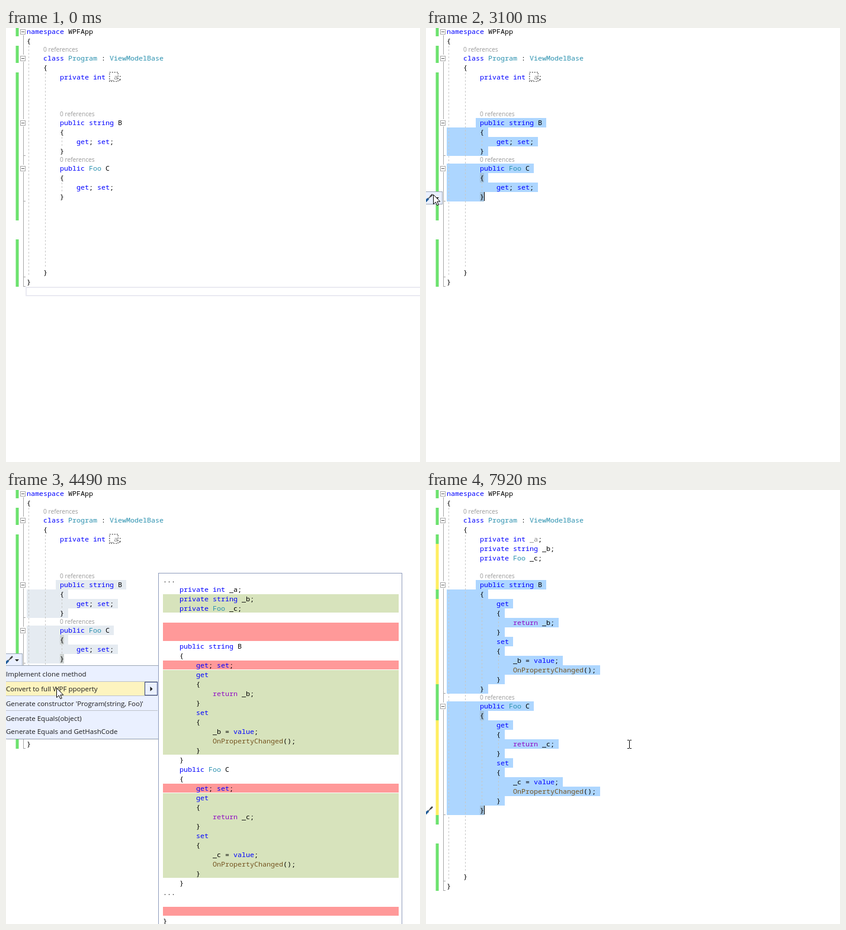
An HTML page with a canvas for the animation above (7.99 s loop, 699 by 733 pixels).

```html
<!DOCTYPE html>
<html lang="en">
<head>
<meta charset="utf-8">
<title>Convert to full property</title>
<style>
html, body { margin: 0; width: 100%; height: 100%; overflow: hidden; background: #fff; }
canvas { display: block; }
</style>
</head>
<body>
<canvas id="stage" width="699" height="733"></canvas>
<script>
const ctx = document.getElementById('stage').getContext('2d');
const LOOP = 7990, COL = 7, ROW = 16, LEFT = 35;
const CODE = '11.667px "Noto Sans Mono", monospace';
const UI = '11.5px "Open Sans", "Noto Sans", sans-serif';
const LENS = '10.2px "Open Sans", "Noto Sans", sans-serif';
const GREEN = '#6ce26e', YELLOW = '#ffee62', GRAY = '#a5a5a5';
const ADD = '#d7e3bc', ADD_PALE = '#ebf1dd', DEL = '#ff9999', DEL_PALE = '#ffcccc';

const KEYWORD = /^(namespace|class|private|public|int|string|object|new|get|set|value)$/;
const TYPE = /^(Program|ViewModelBase|Foo|ICloneable)$/;
const METHOD = /^(OnPropertyChanged|Clone)$/;

// ---- text ----
const FULL = 2, BASIC = 1, PLAIN = 0;

function colorOf(word, level) {
  if (level === PLAIN) return '#000';
  if (KEYWORD.test(word)) return '#0000ff';
  if (word === 'return') return level === FULL ? '#8f08c4' : '#0000ff';
  if (level === FULL && TYPE.test(word)) return '#2b91af';
  if (level === FULL && METHOD.test(word)) return '#74531f';
  return '#000';
}

function label(text, x, y, font, color) {
  ctx.font = font;
  ctx.fillStyle = color;
  ctx.fillText(text, x, y);
}

function code(text, x, y, level = FULL) {
  for (const m of text.matchAll(/\w+|[^\w\s]+/g))
    label(m[0], x + m.index * COL, y + 4, CODE, colorOf(m[0], level));
}

// ---- documents: '@' marks a line with a reference count above, '+' a new line ----
const auto = ['            get; set;'];
const full = name => [
  'get', '{', `    return ${name};`, '}',
  'set', '{', `    ${name} = value;`, '    OnPropertyChanged();', '}'
].map(s => '+            ' + s);

function layout(fields, bodyB, bodyC, blanks) {
  const raw = [
    'namespace WPFApp', '{', '@    class Program : ViewModelBase', '    {',
    '        private int _a;', ...fields, '',
    '@        public string B', '        {', ...bodyB, '        }',
    '@        public Foo C', '        {', ...bodyC, '        }',
    ...Array(blanks).fill(''), '    }', '}'
  ];
  let y = 6 - ROW;
  return raw.map(s => {
    const lens = s[0] === '@', added = s[0] === '+';
    y += lens ? 29 : ROW;
    const text = lens || added ? s.slice(1) : s;
    return { y, text, lens, added, end: LEFT + text.length * COL, x: LEFT + text.search(/\S|$/) * COL };
  });
}

const before = {
  lines: layout(['', ''], auto, auto, 7),
  bars: [[0, 14], [30, 59], [75, 325], [357, 437]], edits: [],
  folds: [6, 51, 160, 237], ticks: [215, 292, 420, 436],
  guides: [[38, 30, 420], [66, 76, 405], [94, 184, 200], [94, 261, 277]],
  first: 160, last: 285, braces: [253, 285]
};
const after = {
  lines: layout(['+        private string _b;', '+        private Foo _c;'], full('_b'), full('_c'), 6),
  bars: [[0, 14], [30, 59], [75, 91], [168, 184], [328, 389], [549, 565], [597, 677]],
  edits: [[91, 168], [184, 328], [389, 549]],
  folds: [6, 51, 160, 365], ticks: [343, 548, 660, 676],
  guides: [[38, 30, 660], [66, 76, 645], [94, 184, 328], [94, 389, 533],
    [122, 216, 232], [122, 280, 312], [122, 421, 437], [122, 485, 517]],
  first: 160, last: 541, braces: [381, 541]
};

// ---- shapes ----
function rect(x0, y0, x1, y1, color) {
  ctx.fillStyle = color;
  ctx.fillRect(x0, y0, x1 - x0, y1 - y0);
}

function frame(x0, y0, x1, y1, color, width = 1) {
  const h = width / 2;
  ctx.strokeStyle = color;
  ctx.lineWidth = width;
  ctx.strokeRect(x0 + h, y0 + h, x1 - x0 - width, y1 - y0 - width);
}

function path(points, color, width) {
  ctx.beginPath();
  points.forEach(([x, y]) => ctx.lineTo(x, y));
  ctx.strokeStyle = color;
  ctx.lineWidth = width;
  ctx.stroke();
}

function triangle(a, b, c) {
  ctx.beginPath();
  [a, b, c].forEach(p => ctx.lineTo(...p));
  ctx.fillStyle = '#1b1b1c';
  ctx.fill();
}

function currentLine(y) { frame(33, y - 8, 710, y + 8, '#eaeaf2', 2); }
function caret(x, y) { rect(x, y - 8, x + 1, y + 7, '#000'); }

function selection(doc, endY, endX, color) {
  for (const l of doc.lines) {
    if (l.y < doc.first || l.y > endY) continue;
    const x0 = l.y === doc.first ? 84 : LEFT;
    rect(x0, l.y - 8, l.y === endY ? endX : l.end + COL, l.y + 8, color);
  }
}

function editor(doc, level, boxed) {
  ctx.setLineDash([3, 3]);
  for (const [x, a, b] of doc.guides) path([[x + .5, a], [x + .5, b]], '#c6c6c6', 1);
  ctx.setLineDash([]);

  doc.bars.forEach(([a, b]) => rect(16.5, a, 21.5, b, GREEN));
  doc.edits.forEach(([a, b]) => rect(16.5, a, 21.5, b, YELLOW));

  const bottom = doc.ticks[3];
  path([[29.5, 0], [29.5, bottom + .5]], GRAY, 1);
  doc.ticks.forEach(y => path([[29, y + .5], [33, y + .5]], GRAY, 1));
  for (const y of doc.folds) {
    rect(24, y - 6, 33, y + 6, '#fff');
    frame(24, y - 4, 33, y + 5, GRAY);
    rect(26, y, 31, y + 1, '#555');
  }

  for (const l of doc.lines) {
    if (l.lens) label('0 references', l.x, l.y - 11, LENS, '#999');
    if (l.text.endsWith('_a;')) {
      code(l.text.replace('_a', '  '), LEFT, l.y);
      label('_a', l.end - 3 * COL, l.y + 4, CODE, '#8c8c8c');
    } else {
      code(l.text, LEFT, l.y, l.added ? level : FULL);
    }
  }
  if (boxed) {
    ctx.setLineDash([2, 2]);
    frame(174, 74, 190, 91, '#666', 1.5);
    ctx.setLineDash([]);
  }
}

function braceMarks(doc) {
  doc.braces.forEach(y => rect(91, y - 8, 98, y + 8, 'rgba(110,110,80,.2)'));
}

function tool(y) {
  path([[-1, y + 6], [4, y + 1]], '#1f5c99', 3.5);
  path([[4, y + 1], [7, y - 2]], '#424242', 1.5);
  path([[7, y - 2], [11, y - 6]], '#424242', 2.5);
}

function button() {
  rect(-2, 276, 28, 298, '#eaf0ff');
  frame(-2, 276, 28, 298, '#9ba7b7');
  tool(287);
  triangle([15, 286], [22, 286], [18.5, 289.5]);
}

// ---- menu and previews ----
const items = [
  ['Implement clone method', 311], ['Convert to full WPF ppoperty', 336],
  ["Generate constructor 'Program(string, Foo)'", 361],
  ['Generate Equals(object)', 386], ['Generate Equals and GetHashCode', 408]
];

function menu(active) {
  rect(2, 300, 260, 422, 'rgba(0,0,0,.06)');
  rect(-2, 296, 258, 421, '#eaf0ff');
  frame(-2, 296, 258, 421, '#9ba7b7');
  [323, 347, 372].forEach(y => rect(0, y, 256, y + 1, '#bec3cb'));
  const y = items[active][1];
  rect(0, y - 12, 256, y + 11, '#fdf4bf');
  rect(234, y - 12, 256, y + 11, '#eaf0ff');
  frame(234, y - 12, 256, y + 11, '#2d3d73');
  triangle([243.5, y - 4], [247.5, y], [243.5, y + 4]);
  items.forEach(([s, c]) => label(s, 0, c + 4, UI, '#1b1b1c'));
}

function panel(top) {
  rect(257, top, 669, 740, '#fff');
  frame(257, top, 669, 740, '#8e9bbc');
}

function band(a, b, color) { rect(265, a, 663, b, color); }

function listing(lines, y, level) {
  lines.forEach((s, i) => code(s, 265, y + i * ROW, level));
}

function mark(x, y, chars) {
  rect(x - 1, y - 8, x + chars * COL + 1, y + 9, ADD);
  frame(x - 1, y - 8, x + chars * COL + 1, y + 9, '#71923c', 2);
}

const cloneLines = [
  '...', '{', '    class Program : ViewModelBase',
  '    class Program : ViewModelBase, System.ICloneable', '    {', '...',
  '', '', '', '', '', '',
  '        public Program Clone()', '        {', '            return new Program()',
  '            {', '                B = B,', '                C = new Foo()',
  '            };', '        }', '',
  '        object ICloneable.Clone()', '        {', '            return Clone();',
  '        }', '    }', '...'
];

function clonePreview() {
  panel(299);
  band(335, 350, DEL_PALE);
  band(351, 366, ADD_PALE);
  band(415, 494, DEL_PALE);
  band(495, 622, ADD_PALE);
  band(639, 702, ADD);
  mark(496, 359, 19);
  cloneLines.slice(12, 20).forEach((s, i) => {
    const t = s.trim();
    mark(265 + (s.length - t.length) * COL, 503 + i * ROW, t.length);
  });
  listing(cloneLines, 311);
}

const accessors = name => ['        get; set;', ...full(name).map(s => s.slice(5))];
const propertyLines = [
  '...', '    private int _a;', '    private string _b;', '    private Foo _c;', '', '', '',
  '    public string B', '    {', ...accessors('_b'), '    }',
  '    public Foo C', '    {', ...accessors('_c'), '    }',
  '...', '', '', '}'
];

function propertyPreview(level) {
  panel(140);
  band(176, 207, ADD);
  band(224, 255, DEL);
  for (const y of [288, 496]) {
    band(y, y + 15, DEL);
    band(y + 16, y + 159, ADD);
  }
  band(704, 719, DEL);
  listing(propertyLines, 152, level);
}

// ---- pointer ----
function arrow(x, y) {
  const pts = [[0, 0], [0, 16], [3.8, 12.5], [6.4, 18.2], [8.8, 17.2], [6.3, 11.6], [11.3, 11.6]];
  ctx.beginPath();
  pts.forEach(([a, b]) => ctx.lineTo(x + .5 + a, y + .5 + b));
  ctx.closePath();
  ctx.fillStyle = '#fff';
  ctx.fill();
  ctx.strokeStyle = '#000';
  ctx.lineWidth = 1;
  ctx.stroke();
}

function beam(x, y) {
  x = Math.round(x);
  y = Math.round(y);
  rect(x, y - 6, x + 1, y + 7, '#000');
  for (const e of [y - 7, y + 7]) {
    rect(x - 3, e, x, e + 1, '#000');
    rect(x + 1, e, x + 4, e + 1, '#000');
  }
}

const mix = (a, b, k) => a + (b - a) * k;
const lerp = (p, q, k) => [mix(p[0], q[0], k), mix(p[1], q[1], k)];
const ease = k => k * k * (3 - 2 * k);

// progress from t0 to t1, advanced in n equal ticks
function ticks(t, t0, t1, n) {
  const k = Math.min(1, Math.max(0, (t - t0) / (t1 - t0)));
  return Math.floor(k * n + 1e-6) / n;
}

const startPos = [497, 613], press = [95, 161], mid = [109, 208], drop = [124, 285];
const tip = [12, 281], pick = [85, 334], rest = [343, 429];

function pointer(t) {
  if (t < 920) return lerp(startPos, press, ease(ticks(t, 70, 840, 10)));
  if (t < 2090) {
    const k = ticks(t, 920, 1710, 10);
    return k < .4 ? lerp(press, mid, k / .4) : lerp(mid, drop, (k - .4) / .6);
  }
  if (t < 2940) {
    const k = ease(ticks(t, 2012, 2870, 11)), bend = [70, 180];
    return lerp(lerp([124, 283], bend, k), lerp(bend, [13, 280], k), k);
  }
  if (t < 3100) return [12, 280];
  if (t < 7670) return lerp(tip, pick, ease(ticks(t, 3640, 4180, 7)));
  return lerp(pick, rest, ease(ticks(t, 7587, 7920, 4)));
}

// ---- scene ----
function draw(t) {
  const [px, py] = pointer(t);
  const done = t >= 6360;
  const doc = done ? after : before;
  const focused = t < 3400 || done;
  rect(0, 0, 699, 733, '#fff');

  let caretAt = null;
  if (t < 920) {
    currentLine(445);
  } else if (t < 999) {
    currentLine(160);
    caretAt = [84, 160];
  } else {
    let endY = doc.last, endX = 98;
    if (t < 1710) {
      const row = doc.lines.filter(l => l.y >= doc.first && l.y - 8 <= py).pop();
      endY = row.y;
      endX = Math.min(row.end, LEFT + Math.round((px - LEFT) / COL) * COL);
    }
    selection(doc, endY, endX, focused ? '#add6ff' : '#e5ebf1');
    if (t >= 1780) braceMarks(doc);
    const hidden = (t >= 2240 && t < 2770) || (t >= 3300 && !done) ||
      (t >= 6900 && t < 7440) || t >= 7970;
    if (!hidden) caretAt = [endX, endY];
  }

  editor(doc, t < 6750 ? PLAIN : FULL, !done);
  if (caretAt) caret(...caretAt);

  if (!done && t >= 2400) {
    if (px < 28 || t > 2870) button();
    else tool(287);
  }
  if (t >= 6990) tool(541);

  if (t >= 3400 && t < 6270) {
    const second = py >= 323;
    menu(second ? 1 : 0);
    if (t >= 3640 && !second) clonePreview();
    if (t >= 4260) propertyPreview(t < 4490 ? BASIC : FULL);
  }

  if (t >= 70) (t >= 2090 && t < 7670 ? arrow : beam)(px, py);
}

const begin = performance.now();
function tick() {
  draw((performance.now() - begin) % LOOP);
  requestAnimationFrame(tick);
}
tick();
</script>
</body>
</html>
```
